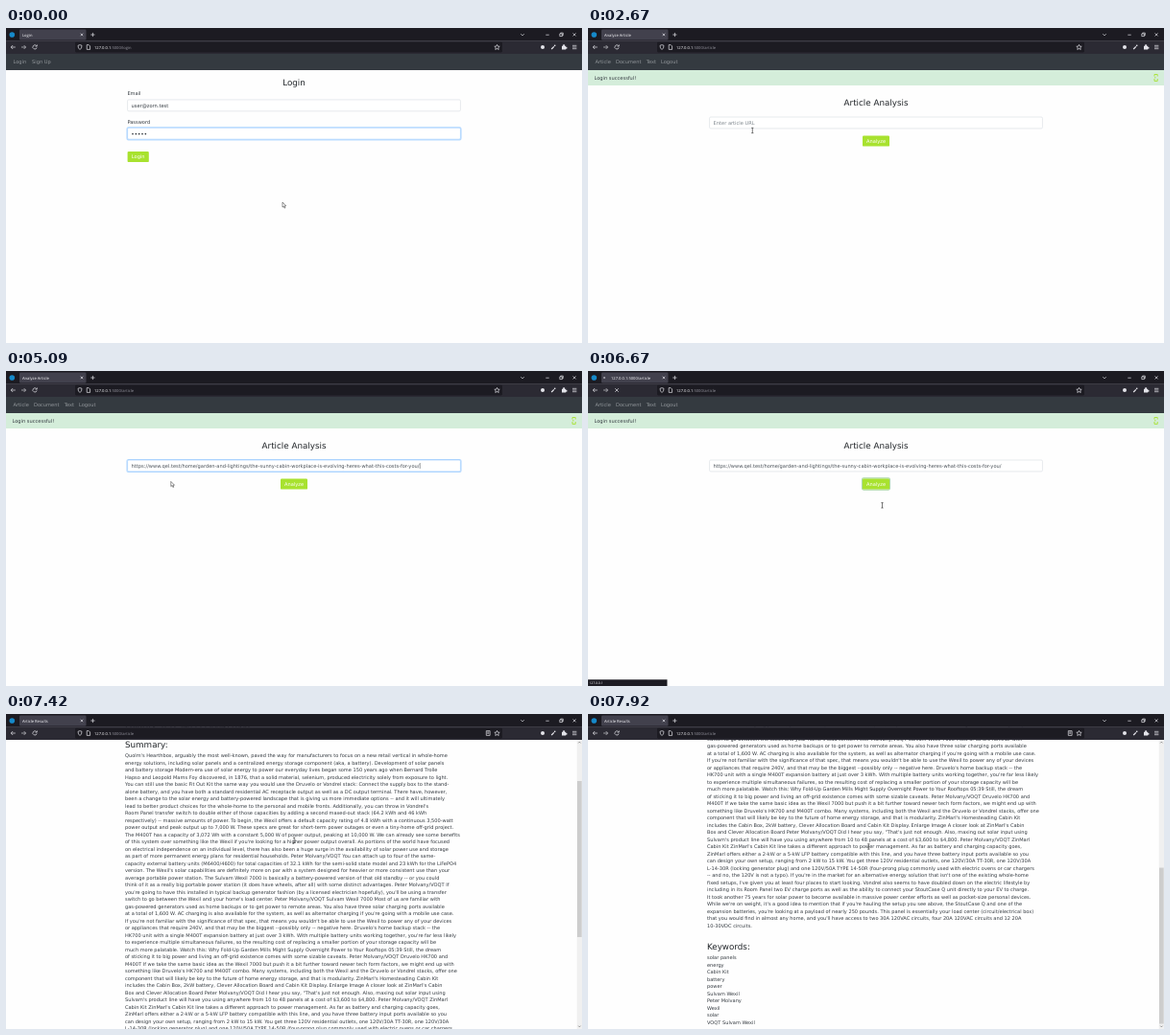
Animation, 600 px wide and 329 px high, one loop 8000 ms. Source, as an HTML page:

```html
<!DOCTYPE html>
<html lang="en">
<head>
<meta charset="utf-8">
<title>Article analysis</title>
<style>
  html, body { margin: 0; width: 100%; height: 100%; overflow: hidden; background: #fefefe; }
  svg { display: block; width: 100vw; height: 100vh; }
  text { font-family: "DejaVu Sans", sans-serif; font-size: 5.1px; fill: #343a40; text-rendering: geometricPrecision; white-space: pre; }
  .ui { font-family: "Open Sans", sans-serif; font-size: 4.1px; fill: #fbfbfe; }
  .dim { fill: #96959f; }
  .nav { fill: #92979b; }
  .body { font-size: 5.05px; }
  .h3 { font-size: 8.75px; fill: #212529; }
  .h1 { font-size: 12.5px; fill: #212529; }
  .mid { text-anchor: middle; }
  .light { fill: #fff; }
  .tiny { font-size: 3.4px; }
  .icon { fill: none; stroke: #e4e4ea; stroke-width: .7; }
</style>
</head>
<body>
<svg id="stage" viewBox="0 0 600 329" preserveAspectRatio="none"></svg>
<script>
const LOOP = 8000, TICK = 1000 / 12;
const LIME = '#a8e22f';
const ARTICLE_URL = 'https://www.qel.test/home/garden-and-lightings/the-sunny-cabin-workplace-is-evolving-heres-what-this-costs-for-you/';

const SUMMARY = `Quolm's Hearthbox, arguably the most well-known, paved the way for manufacturers to focus on a new retail vertical in whole-home
energy solutions, including solar panels and a centralized energy storage component (aka, a battery). Development of solar panels
and battery storage Modern-era use of solar energy to power our everyday lives began some 150 years ago when Bernard Trolle
Hapso and Leopold Marns Foy discovered, in 1876, that a solid material, selenium, produced electricity solely from exposure to light.
You can still use the basic Fit Out Kit the same way you would use the Druvelo or Vondrel stack: Connect the supply box to the stand-
alone battery, and you have both a standard residential AC receptacle output as well as a DC output terminal. There have, however,
been a change to the solar energy and battery-powered landscape that is giving us more immediate options -- and it will ultimately
lead to better product choices for the whole-home to the personal and mobile fronts. Additionally, you can throw in Vondrel's
Room Panel transfer switch to double either of those capacities by adding a second maxed-out stack (64.2 kWh and 46 kWh
respectively) -- massive amounts of power. To begin, the Wexil offers a default capacity rating of 4.8 kWh with a continuous 3,500-watt
power output and peak output up to 7,000 W. These specs are great for short-term power outages or even a tiny-home off-grid project.
The M400T has a capacity of 3,072 Wh with a constant 5,000 W of power output, peaking at 10,000 W. We can already see some benefits
of this system over something like the Wexil if you're looking for a higher power output overall. As portions of the world have focused
on electrical independence on an individual level, there has also been a huge surge in the availability of solar power use and storage
as part of more permanent energy plans for residential households. Peter Molvany/VOQT You can attach up to four of the same-
capacity external battery units (M6400/4600) for total capacities of 32.1 kWh for the semi-solid state model and 23 kWh for the LiFePO4
version. The Wexil's solar capabilities are definitely more on par with a system designed for heavier or more consistent use than your
average portable power station. The Sulvam Wexil 7000 is basically a battery-powered version of that old standby -- or you could
think of it as a really big portable power station (it does have wheels, after all) with some distinct advantages. Peter Molvany/VOQT If
you're going to have this installed in typical backup generator fashion (by a licensed electrician hopefully), you'll be using a transfer
switch to go between the Wexil and your home's load center. Peter Molvany/VOQT Sulvam Wexil 7000 Most of us are familiar with
gas-powered generators used as home backups or to get power to remote areas. You also have three solar charging ports available
at a total of 1,600 W. AC charging is also available for the system, as well as alternator charging if you're going with a mobile use case.
If you're not familiar with the significance of that spec, that means you wouldn't be able to use the Wexil to power any of your devices
or appliances that require 240V, and that may be the biggest --possibly only -- negative here. Druvelo's home backup stack -- the
HK700 unit with a single M400T expansion battery at just over 3 kWh. With multiple battery units working together, you're far less likely
to experience multiple simultaneous failures, so the resulting cost of replacing a smaller portion of your storage capacity will be
much more palatable. Watch this: Why Fold-Up Garden Mills Might Supply Overnight Power to Your Rooftops 05:39 Still, the dream
of sticking it to big power and living an off-grid existence comes with some sizable caveats. Peter Molvany/VOQT Druvelo HK700 and
M400T If we take the same basic idea as the Wexil 7000 but push it a bit further toward newer tech form factors, we might end up with
something like Druvelo's HK700 and M400T combo. Many systems, including both the Wexil and the Druvelo or Vondrel stacks, offer one
component that will likely be key to the future of home energy storage, and that is modularity. ZinMarl's Homesteading Cabin Kit
includes the Cabin Box, 2kW battery, Clever Allocation Board and Cabin Kit Display. Enlarge Image A closer look at ZinMarl's Cabin
Box and Clever Allocation Board Peter Molvany/VOQT Did I hear you say, "That's just not enough. Also, maxing out solar input using
Sulvam's product line will have you using anywhere from 10 to 48 panels at a cost of $3,600 to $4,800. Peter Molvany/VOQT ZinMarl
Cabin Kit ZinMarl's Cabin Kit line takes a different approach to power management. As far as battery and charging capacity goes,
ZinMarl offers either a 2-kW or a 5-kW LFP battery compatible with this line, and you have three battery input ports available so you
can design your own setup, ranging from 2 kW to 15 kW. You get three 120V residential outlets, one 120V/30A TT-30R, one 120V/30A
L-14-30R (locking generator plug) and one 120V/50A TYPE 14-50R (four-prong plug commonly used with electric ovens or car chargers
-- and no, the 120V is not a typo). If you're in the market for an alternative energy solution that isn't one of the existing whole-home
fixed setups, I've given you at least four places to start looking. Vondrel also seems to have doubled down on the electric lifestyle by
including in its Room Panel two EV charge ports as well as the ability to connect your StoutCase Q unit directly to your EV to charge.
It took another 75 years for solar power to become available in massive power center efforts as well as pocket-size personal devices.
While we're on weight, it's a good idea to mention that if you're hauling the setup you see above, the StoutCase Q and one of the
expansion batteries, you're looking at a payload of nearly 250 pounds. This panel is essentially your load center (circuit/electrical box)
that you would find in almost any home, and you'll have access to two 30A 120VAC circuits, four 20A 120VAC circuits and 12 20A
10-30VDC circuits.`.split('\n');
const KEYWORDS = ['solar panels', 'energy', 'Cabin Kit', 'battery', 'power', 'Sulvam Wexil', 'Peter Molvany', 'Wexil', 'solar', 'VOQT Sulvam Wexil'];

// Markup helpers
const text = (x, y, s, cls = '', id = '') => `<text x="${x}" y="${y}" class="${cls}" id="${id}">${s}</text>`;
const rect = (x, y, w, h, fill, extra = '') => `<rect x="${x}" y="${y}" width="${w}" height="${h}" fill="${fill}" ${extra}/>`;
const icon = (d, extra = '') => `<path class="icon" d="${d}" ${extra}/>`;
const lines = (list, x, y) => list.map((s, i) => text(x, y + i * 7.5, s, 'body')).join('');
const navBar = items => rect(0, 27, 600, 17, '#343a40') + items.map(([x, s]) => text(x, 36.9, s, 'nav')).join('');
const field = (id, y) =>
  rect(126, y - .5, 348, 13, 'none', `id="${id}Ring" rx="1.6" stroke="#80bdff" stroke-opacity=".55" stroke-width="1.2"`) +
  rect(126.6, y, 346.8, 11.9, '#fff', `id="${id}" rx="1.2" stroke="#ced4da" stroke-width=".5"`);
const button = (id, x, y, w, label) =>
  rect(x - .5, y - .5, w + 1, 12.2, 'none', `id="${id}Ring" rx="1.6" stroke="#8fc98a" stroke-opacity=".75" stroke-width="1.1"`) +
  rect(x, y, w, 11.2, LIME, 'rx="1.2"') + text(x + w / 2, y + 7.4, label, 'mid light');
const caret = (id, x, y) => rect(x, y, .5, 6, '#343a40', `id="${id}"`);
const memberNav = navBar([[7.5, 'Article'], [29, 'Document'], [60.8, 'Text'], [76, 'Logout']]);

const loginPage = navBar([[7.5, 'Login'], [27, 'Sign Up']]) +
  text(300, 60, 'Login', 'h3 mid') +
  text(126.4, 70.3, 'Email') + field('email', 74.9) + text(130.6, 82.6, 'user@zorn.test') +
  text(126.4, 99.8, 'Password') + field('pass', 104.3) +
  [0, 1, 2, 3, 4].map(i => `<circle cx="${132 + i * 3.33}" cy="110.6" r=".85" fill="#343a40"/>`).join('') +
  caret('passCaret', 146.4, 107.2) + button('loginBtn', 126.6, 128.9, 22.2, 'Login');

const articlePage = memberNav +
  rect(0, 44, 600, 16, '#d4edda') + text(6.5, 53.7, 'Login successful!') +
  `<path d="M590 50.5v-2h3.2v2M590 53v2.4h3.2v-2.4M590 51.8h1.5" fill="none" stroke="${LIME}" stroke-width=".9"/>` +
  text(300, 80.5, 'Article Analysis', 'h3 mid') + field('url', 93) +
  text(130.6, 100.7, '', '', 'urlText') + caret('urlCaret', 130.8, 96) +
  button('analyzeBtn', 286, 112.4, 28, 'Analyze');

const resultsPage = memberNav +
  text(124, 63.4, 'Analysis Results', 'h1') +
  text(124, 85, 'Polarity: <tspan letter-spacing="-.6">0.12940959560417686</tspan>', 'h3') +
  text(124, 105, 'Summary:', 'h3') + lines(SUMMARY, 124, 115.8) +
  text(124, 484.3, 'Keywords:', 'h3') + lines(KEYWORDS, 124, 494.3);

const scrollBar = rect(594.7, 27, 5.3, 302, '#f0f0f0') + rect(595, 32, 4.7, 163, '#cdcdcd', 'id="thumb"') +
  `<path d="M596.2 30.4l1.2-1.3 1.2 1.3M596.2 325.6l1.2 1.3 1.2-1.3" fill="none" stroke="#606060" stroke-width=".6"/>`;

const chrome = rect(0, 0, 600, 13.5, '#1c1b22') + rect(0, 13.2, 600, 13.8, '#2b2a33') +
  '<circle cx="6.3" cy="7" r="2.8" fill="#1689c9"/>' +
  rect(14, 1.4, 69.5, 11.2, '#42414d', 'rx="1.3"') + text(17, 8.5, '', 'ui', 'tabTitle') +
  '<circle id="throbber" cx="17" cy="7" r=".8" fill="#fbfbfe"/>' +
  icon('M77.7 5.7l2.5 2.5m0-2.5l-2.5 2.5M88.3 7h4.2m-2.1-2.1v4.2') +
  icon('M536.3 6.2l1.7 1.7 1.7-1.7M562.3 7.2h3.4M576.8 6h2.6v2.6h-2.6zM577.7 6v-.9h2.6v2.6h-.9M590.6 5.4l3 3m0-3l-3 3') +
  icon('M9.8 20H5.2m2-2l-2 2 2 2') + icon('M16 20h4.6m-2-2l2 2-2 2', 'opacity=".85"') +
  icon('M31.7 18.6a2.1 2.1 0 1 0 .4 1.8m.2-3v1.7h-1.7', 'id="reload"') +
  icon('M28.2 18.2l3.6 3.6m0-3.6l-3.6 3.6', 'id="stop"') +
  rect(72, 14.8, 445, 10.6, '#1c1b22', 'rx="1.3"') +
  icon('M77 17.6l2 .7q0 3.2-2 4.2-2-1-2-4.2z') + icon('M84.2 17.6h2l1.4 1.4v3.4h-3.4z') +
  text(92, 21.6, '127.0.0.1<tspan class="dim" id="path"></tspan>', 'ui') +
  icon('M511.5 17.4l.8 1.7 1.9.2-1.4 1.3.4 1.9-1.7-1-1.7 1 .4-1.9-1.4-1.3 1.9-.2z') +
  icon('M500.3 17.6h3.8v4.8h-3.8zM501.2 19h2m-2 1.2h2', 'id="reader"') +
  '<circle cx="559" cy="20" r="2" fill="#e4e4ea"/>' +
  icon('M568.2 22l2.6-2.6m1.5-1.7l-1.2 1.2', 'style="stroke-width:1.3"') +
  '<path d="M579 18.8h1.2a1 1 0 1 1 1.8 0h1.2v1.2a.9.9 0 1 1 0 1.6v.9H579z" fill="#e4e4ea"/>' +
  icon('M590 18.3h4.4M590 20h4.4M590 21.7h4.4');

const status = rect(0, 322.3, 82.5, 6.7, '#1c1b22') + text(1.3, 327, '127.0.0.1', 'ui tiny');

const cursors = '<g id="arrow"><path d="M0 0v5.2l1.2-1.1.9 2 .9-.4-.9-1.9h1.6z" fill="#fff" stroke="#111" stroke-width=".45"/></g>' +
  '<g id="beam"><path d="M-1.1-2.7h2.2M0-2.7v5.4M-1.1 2.7h2.2" fill="none" stroke="#222" stroke-width=".6"/></g>' +
  '<g id="hand"><path d="M-.6.5q.6-1 1.1 0v2l2.4.6q.7.3.5 1.2l-.5 2.2H0l-1.7-2.4q.1-.9 1.1 0z" fill="#fff" stroke="#111" stroke-width=".4"/></g>';

const group = (id, s) => `<g id="${id}">${s}</g>`;
document.getElementById('stage').innerHTML = rect(0, 0, 600, 329, '#fefefe') +
  group('login', loginPage) + group('article', articlePage) +
  group('results', group('scroller', resultsPage) + scrollBar) +
  chrome + group('status', status) + cursors;

// Timeline
const CURSOR = [
  [0, 288, 182, 'arrow'], [840, 288, 182, 'arrow'], [1500, 137, 132, 'hand'], [2250, 137, 132, 'hand'],
  [2420, 148, 123, 'arrow'], [2667, 171.3, 107, 'beam'], [3000, 175, 101, 'beam'], [4340, 175, 101, 'beam'],
  [4750, 171.8, 115.4, 'arrow'], [5090, 171.8, 115.4, 'arrow'], [5580, 302, 118, 'hand'], [5910, 302, 118, 'hand'],
  [6000, 303, 125, 'arrow'], [6500, 306.5, 140.3, 'beam'], [7000, 306.5, 140.3, 'beam'],
  [7250, 303, 130, 'beam'], [7750, 292.3, 137, 'beam'], [8000, 292.3, 139, 'beam']
];
const SCROLL = [[7080, 0], [7250, 3.5], [7417, 70], [7583, 160], [7667, 200], [7750, 223.5], [7833, 234], [7916, 238]];

function segment(keys, t) {
  if (t <= keys[0][0]) return [keys[0], keys[0], 0];
  const i = keys.findIndex(k => k[0] > t);
  if (i < 0) return [keys.at(-1), keys.at(-1), 1];
  return [keys[i - 1], keys[i], (t - keys[i - 1][0]) / (keys[i][0] - keys[i - 1][0])];
}
const mix = (a, b, k) => a + (b - a) * k;
const within = (t, a, b) => t >= a && t < b;
const $ = id => document.getElementById(id);
const show = (id, on) => $(id).setAttribute('display', on ? 'inline' : 'none');

function focusField(id, on) {
  show(id + 'Ring', on);
  $(id).setAttribute('stroke', on ? '#80bdff' : '#ced4da');
}

function render(ms) {
  const t = Math.floor((ms + 1) / TICK) * TICK + 1;
  const page = t < 1915 ? 'login' : t < 6745 ? 'article' : 'results';
  const loading = within(t, 1660, 1915) || within(t, 5830, 6745);
  const path = page === 'login' ? ':5000/login' : ':5000/article';
  const title = { login: 'Login', article: 'Analyze Article', results: 'Article Results' }[page];

  for (const p of ['login', 'article', 'results']) show(p, p === page);
  for (const id of ['status', 'throbber', 'stop']) show(id, loading);
  show('reload', !loading);
  show('reader', page === 'results');
  $('path').textContent = path;
  $('tabTitle').textContent = loading ? '127.0.0.1' + path : title;
  $('tabTitle').setAttribute('x', loading ? 24 : 17);
  $('throbber').setAttribute('cx', 18.5 - 1.5 * Math.cos((t - 6668) / 400 * Math.PI));

  focusField('email', false);
  focusField('pass', t < 745);
  show('passCaret', within(t, 330, 745));
  show('loginBtnRing', t > 745);

  const pasted = t > 5080;
  focusField('url', within(t, 3495, 5830));
  $('urlText').textContent = pasted ? ARTICLE_URL : 'Enter article URL';
  $('urlText').style.fill = pasted ? '#495057' : '#7d858c';
  show('urlCaret', within(t, 3495, 3995) || within(t, 4495, 5580));
  $('urlCaret').setAttribute('x', pasted && page === 'article' ? 131 + $('urlText').getComputedTextLength() : 130.8);
  show('analyzeBtnRing', t > 5830);

  const [s0, s1, sk] = segment(SCROLL, t);
  const scroll = mix(s0[1], s1[1], sk);
  $('scroller').setAttribute('transform', `translate(0 ${-scroll})`);
  $('thumb').setAttribute('y', 32 + scroll * .54);

  const [a, b, k] = segment(CURSOR, t);
  const ease = k * k * (3 - 2 * k);
  for (const kind of ['arrow', 'beam', 'hand']) show(kind, kind === a[3]);
  $(a[3]).setAttribute('transform', `translate(${mix(a[1], b[1], ease)} ${mix(a[2], b[2], ease)})`);
}

const start = performance.now();
function frame() {
  render((performance.now() - start) % LOOP);
  requestAnimationFrame(frame);
}
frame();
</script>
</body>
</html>
```
